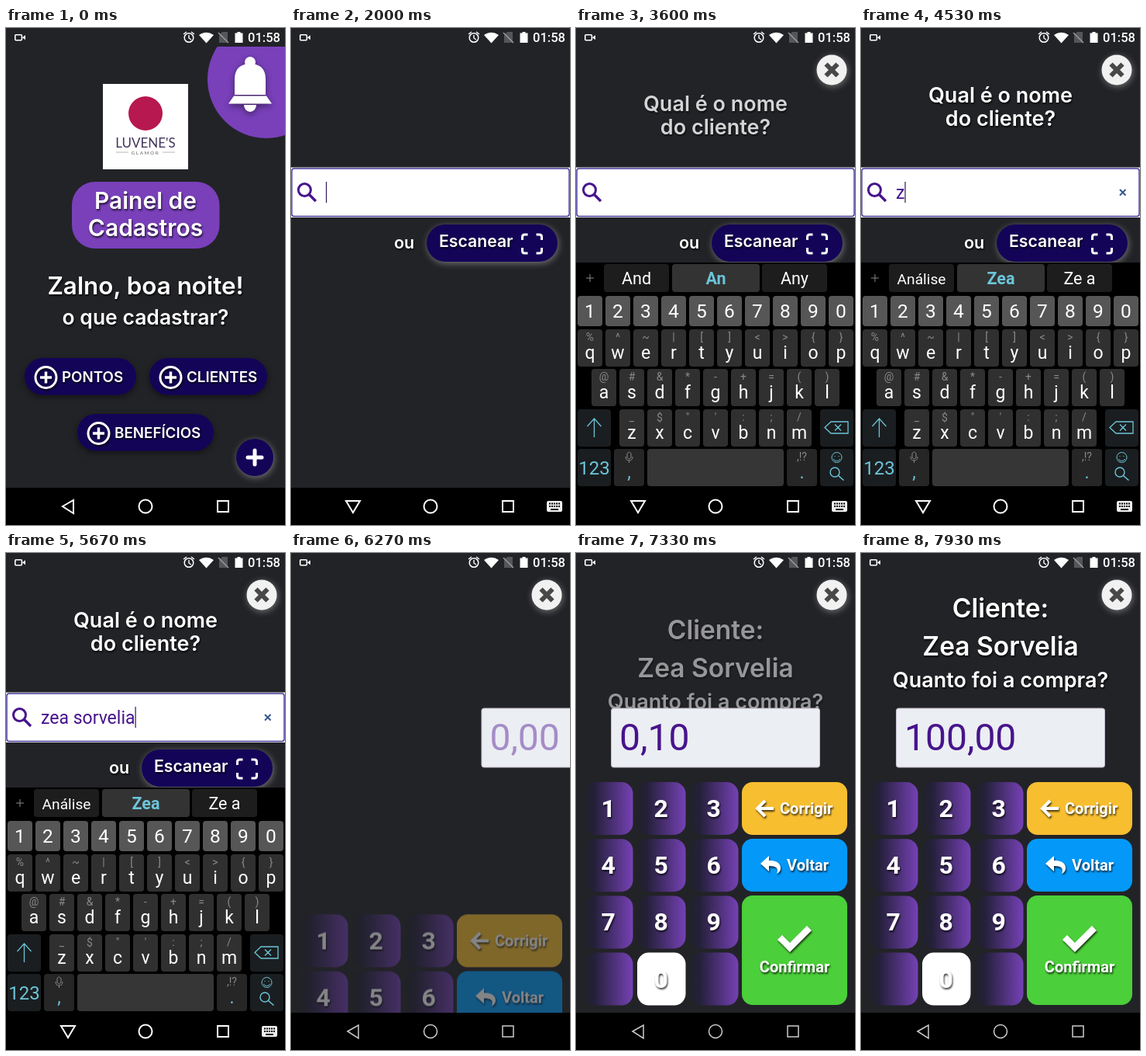
An HTML page for the animation above (8 s loop, 360 px wide and 640 px high).

```html
<!DOCTYPE html>
<html lang="pt-BR">
<head>
<meta charset="utf-8">
<title>Painel de Cadastros</title>
<style>
html, body { margin: 0; width: 100%; height: 100%; overflow: hidden; background: #222327; }
svg { display: block; width: 100vw; height: 100vh; }
text { font-family: Roboto, sans-serif; fill: #fff; }
.h { font-family: Inter, sans-serif; font-weight: 600; }
.m { text-anchor: middle; }
.b { font-weight: 700; }
.sh { filter: drop-shadow(1px 2px 1px #000b); }
.lift { filter: drop-shadow(0 3px 4px #0007); }
.glow { filter: drop-shadow(1px 2px 4px #aaa9); }
</style>
</head>
<body>
<svg id="stage" viewBox="0 0 360 640"></svg>
<script>
const LOOP = 8000;
const NAVY = '#140458', VIOLET = '#7940ba', INK = '#47148c', CYAN = '#6cc5d9';

const text = (s, x, y, size, cls = '', extra = '') =>
  `<text x="${x}" y="${y}" font-size="${size}" class="${cls}" ${extra}>${s}</text>`;
const rect = (x, y, w, h, r, fill, extra = '') =>
  `<rect x="${x}" y="${y}" width="${w}" height="${h}" rx="${r}" fill="${fill}" ${extra}/>`;
const circle = (x, y, r, fill, extra = '') =>
  `<circle cx="${x}" cy="${y}" r="${r}" fill="${fill}" ${extra}/>`;
const line = (d, width, color = '#fff', extra = '') =>
  `<path d="${d}" fill="none" stroke="${color}" stroke-width="${width}" ${extra}/>`;
const group = (id, body, cls = '') => `<g id="${id}" class="${cls}">${body}</g>`;

// Home screen
const pill = (x, y, w, label) => rect(x, y, w, 47.5, 23.5, NAVY, 'class="lift"') +
  `<g class="sh">${circle(x + 27.5, y + 25, 13.5, 'none', 'stroke="#fff" stroke-width="3"')}` +
  line(`M${x + 20} ${y + 25}h15m-7.5 -7.5v15`, 3.5) + '</g>' +
  text(label, x + 48, y + 30.5, 18.8, 'h sh');

const bell = `<g class="lift" fill="#fff">${circle(315, 44, 7, '#fff')}
  <path d="M295 86V66C295 52 303 46 315 46S335 52 335 66V86Z"/>
  <path d="M294 87.5H336L343 97.5H287Z"/><path d="M307 99H323A8 9 0 0 1 307 99Z"/></g>`;

const logo = rect(125, 72, 110, 110, 0, '#fff') + circle(180, 110, 22, '#b7184f') +
  text("LUVENE'S", 180, 153.5, 17, 'm', 'style="font-family:Lato,sans-serif;fill:#43365c"') +
  text('GLAMOR', 180, 162.5, 6.5, 'm', 'letter-spacing="1.5" style="font-family:Lato,sans-serif;fill:#666"') +
  line('M142 160h16m44 0h16', .7, '#999');

const home = group('home',
  circle(336, 66, 76, VIOLET, 'clip-path="url(#below)"') +
  group('menu', bell + logo +
    rect(85, 198, 190.5, 86, 30, VIOLET) +
    text('Painel de', 180, 233, 30, 'h m sh') + text('Cadastros', 180, 268, 30, 'h m sh') +
    text('Zalno, boa noite!', 180, 343, 31.4, 'h m sh') +
    text('o que cadastrar?', 180, 382, 26.5, 'h m sh') +
    pill(24, 425, 144, 'PONTOS') + pill(185, 425, 152, 'CLIENTES') + pill(92, 497, 176, 'BENEFÍCIOS')) +
  circle(321, 553, 24, NAVY, 'class="glow"') +
  line('M312 553h18m-9 -9v18', 5, '#fff', 'stroke-linecap="round"'));

// Client search
const search = group('search',
  group('ask', text('Qual é o nome', 180, 108, 27, 'h m sh') + text('do cliente?', 180, 138, 27, 'h m sh')) +
  rect(0, 179.5, 360, 64.5, 0, '#fff') +
  rect(1, 181, 358, 61.5, 3, '#fff', 'stroke="#44389a" stroke-width="1.5"') +
  circle(17.5, 208.5, 8, 'none', `stroke="${INK}" stroke-width="3"`) +
  line('M23 214L32 223', 3.4, INK) +
  text('', 45, 220, 23, '', `id="query" style="fill:${INK}"`) +
  rect(0, 198, 1.2, 27, 0, '#2d1a55', 'id="caret"') +
  line('M334 208l7.5 7.5m0 -7.5l-7.5 7.5', 2, '#35578c', 'id="clear"') +
  text('ou', 133, 284, 21.5, 'h sh') +
  rect(175, 253, 169, 48, 24, NAVY, 'class="glow"') +
  text('Escanear', 191, 282, 21.2, 'h sh') +
  line('M298.5 273v-4q0-3 3-3h4m11 0h4q3 0 3 3v4m0 10v4q0 3-3 3h-4m-11 0h-4q-3 0-3-3v-4', 3));

// On-screen keyboard
const cyan = `style="fill:${CYAN}"`;
const key = (x, y, w, fill, label = '', hint = '', extra = '') => rect(x, y, w, 48, 4, fill) +
  text(hint, x + w / 2, y + 15, 14, 'm', 'style="fill:#8a8a8a"') +
  text(label, x + w / 2, y + 37.5, 23, 'm', extra);
const row = (x, y, letters, hints) =>
  [...letters].map((c, i) => key(x + 36 * i, y, 32, '#303030', c, hints[i].replace('<', '&lt;'))).join('');

const keyboard = group('keyboard', rect(0, 302, 360, 350, 0, '#000') +
  line('M13 322h10m-5 -5v10', 1, '#888') +
  [[36, 84, '#1d1d1d'], [124, 113, '#333'], [240, 84, '#1d1d1d']].map(([x, w, fill], i) =>
    rect(x, 304, w, 36, 4, fill) +
    text('', x + w / 2, 329.5, 21.5, 'm' + (i == 1 ? ' b' : ''), `id="hint${i}" ` + (i == 1 ? cyan : ''))).join('') +
  [...'1234567890'].map((c, i) => rect(2 + 36 * i, 345, 32, 39, 4, '#565656') + text(c, 18 + 36 * i, 373, 24.5, 'm')).join('') +
  row(2, 388, 'qwertyuiop', '%^~|[]<>{}') +
  row(20, 439, 'asdfghjkl', '@#&*-+=()') +
  row(56, 491, 'zxcvbnm', '_$"\':;/') +
  key(2, 491, 43, '#1b1e20') + key(315, 491, 43, '#1b1e20') +
  key(2, 542, 43, '#1b1e20') + key(49, 542, 39, '#262626', ',', '', cyan) +
  key(92, 542, 176, '#363636') + key(272, 542, 39, '#262626', '.', ',!?', cyan) + key(315, 542, 43, '#1b1e20') +
  text('123', 23.5, 575, 24, 'm', cyan) +
  line('M23.5 527V503m-9 10l9 -10l9 10', 1.3, CYAN) +
  line('M321 514.5l8 -7.5h22v15h-22zm13 -4l8 8m0 -8l-8 8', 1.3, CYAN) +
  line('M66 548q2.5 -4 5 0v5q-2.5 4 -5 0zm-2 4q0 5 4.5 5t4.5 -5m-4.5 5v3', 1, '#888') +
  line('M332 555q4.5 5 9 0m-7 -4v1m5 -1v1', 1, CYAN) +
  circle(336.5, 553, 6.5, 'none', `stroke="${CYAN}"`) +
  circle(334, 572, 6, 'none', `stroke="${CYAN}" stroke-width="1.4"`) + line('M338.5 576.5l7 6', 1.6, CYAN));

// Purchase amount
const PAD = [...'123456789 0 '];
const padKey = (c, i) => {
  const x = 11 + 68 * (i % 3), y = 295 + 73.2 * Math.floor(i / 3);
  return rect(x, y, 62.5, 68, 15, 'url(#padFill)', `id="pad${i}"`) + text(c, x + 30.7, y + 45, 32, 'b m sh');
};
const amount = group('amount',
  group('who', text('Cliente:', 180, 83, 33.5, 'h m sh') + text('Zea Sorvelia', 180, 132, 33.5, 'h m sh') +
    text('Quanto foi a compra?', 180, 172.5, 27, 'h m sh')) +
  group('field', rect(45.5, 200, 269, 76, 3, '#ebeef2', 'stroke="#bfb8c8"') + text('', 56, 254, 48, '', 'id="value"')) +
  group('pad', PAD.map(padKey).join('') +
    rect(214, 295, 136, 68, 14, '#f7be30') + rect(214, 368, 136, 68, 14, '#0499f9') + rect(214, 441, 136, 141, 14, '#4bcf3a') +
    text('Corrigir', 263, 335.5, 20, 'b sh') + text('Voltar', 272, 408.5, 20, 'b sh') + text('Confirmar', 282, 540, 20, 'b m sh') +
    line('M255 329H235m9 -10l-10 10l10 10', 4, '#fff', 'class="sh"') +
    '<path class="sh" fill="#fff" d="M238 400l11-10v6c11 0 15 4 15 10 0 4-3 6-5 7 3-8-2-10-10-10v7z"/>' +
    line('M263 495l13 13L301 483', 8.5, '#fff', 'class="sh"')));

const close = group('close', circle(330, 54, 19.5, '#f1f1f1') +
  line('M322.5 46.5l15 15m0 -15l-15 15', 6, '#484848'), 'glow');

// System bars
const status = rect(11.8, 8.8, 8.6, 7, 1, 'none', 'stroke="#fff" stroke-width="1.6"') +
  '<path d="M21 12.3l4-3v6z" fill="#fff"/>' +
  circle(236, 12.5, 5.8, 'none', 'stroke="#fff" stroke-width="1.5"') +
  line('M236 9v4l3 2M229 8l4 -3m6 0l4 3', 1.4) +
  '<path d="M249 9Q258.5 2.5 268 9L258.5 19.5Z" fill="#fff"/>' +
  '<path d="M275 9l4-4h7v14h-11z" fill="#55565a"/>' + line('M274 6l13 13', 1.5, '#999') +
  '<path d="M295.5 6.5h3v-1.5h4v1.5h3v12.5h-10z" fill="#fff"/>' +
  text('01:58', 312, 18, 16.5, '', 'font-weight="500"');

const nav = rect(0, 592, 360, 48, 0, '#000') +
  `<g id="buttons" fill="none">
    <path id="back" d="M73 616L87 608V625Z"/><path id="down" d="M71 609H89L80 624Z"/>
    <circle cx="180" cy="616" r="8.5"/><path d="M273 609h14v14h-14z"/></g>` +
  group('switcher', rect(330, 609, 20, 14, 2, '#eee') +
    line('M333 612.5h14m-14 3.5h14', 2, '#000', 'stroke-dasharray="2 1"') + line('M335 620h10', 1.8, '#000'));

const stage = document.getElementById('stage');
stage.innerHTML = `<defs><clipPath id="below"><rect y="24" width="360" height="600"/></clipPath>
  <linearGradient id="padFill"><stop stop-color="#20222a"/><stop offset=".2" stop-color="#242039"/>
  <stop offset="1" stop-color="#7541b5"/></linearGradient></defs>
  <rect width="360" height="640" fill="#222327"/>` + home + search + keyboard + amount + close + nav + status;

const el = {};
stage.querySelectorAll('[id]').forEach(e => el[e.id] = e);

// Timetables: [start, state]
const QUERY = [[0, ''], [4470, 'z'], [4730, 'zea'], [5670, 'zea sorvelia']];
const HINTS = [[0, ['', '', '']], [2930, ['And', 'An', 'Any']], [3800, ['Análise', 'Zea', 'Ze a']]];
const VALUE = [[0, '0,00'], [7130, '0,01'], [7330, '0,10'], [7530, '1,00'], [7730, '10,00'], [7930, '100,00']];
const PRESS = [[7070, 0], [7270, 10], [7470, 10], [7670, 10], [7870, 10]];
const CARET = [[0, false], [2000, true], [2530, false], [3070, true], [3470, false],
  [4000, true], [5270, false], [5670, true]];

const at = (table, t) => table.findLast(([start]) => t >= start)[1];
const ramp = (t, a, b) => Math.min(1, Math.max(0, (t - a) / (b - a)));
const bezier = (s, p, q) => 3 * (1 - s) ** 2 * s * p + 3 * (1 - s) * s * s * q + s ** 3;
function ease(x) {
  let lo = 0, hi = 1;
  for (let i = 0; i < 20; i++) {
    const mid = (lo + hi) / 2;
    if (bezier(mid, .25, .25) < x) lo = mid; else hi = mid;
  }
  return bezier(hi, .1, 1);
}
const show = (id, on) => el[id].style.display = on ? '' : 'none';
const put = (id, x, y, opacity = 1) => {
  el[id].setAttribute('transform', `translate(${x} ${y})`);
  el[id].setAttribute('opacity', opacity);
};
const write = (id, s) => { if (el[id].textContent !== s) el[id].textContent = s; };

function draw(t) {
  show('home', t < 2000);
  put('menu', 0, 0, 1 - ramp(t, 1410, 1670));

  show('search', t >= 2000 && t < 5930);
  put('search', 0, 0, 1 - ramp(t, 5690, 5930));
  const ask = ease(ramp(t, 3135, 4065));
  put('ask', 0, 60 * (1 - ask) - 12.5, ask);
  const query = at(QUERY, t);
  write('query', query);
  show('clear', query);
  show('caret', at(CARET, t));
  el.caret.setAttribute('x', 45 + el.query.getComputedTextLength());

  const board = ease(ramp(t, 2230, 2530)) * (1 - ramp(t, 5690, 5900));
  show('keyboard', board > 0);
  put('keyboard', 0, 90 * (1 - board), board);
  at(HINTS, t).forEach((s, i) => {
    write('hint' + i, s);
    el['hint' + i].setAttribute('font-size', s.length > 6 ? 19.2 : 21.5); // long words shrink to fit
  });
  const typing = t >= 1600 && t < 5800;
  show('switcher', typing);
  show('down', typing);
  show('back', !typing);
  el.buttons.setAttribute('stroke', board > 0 ? '#fff' : '#ccc');
  el.buttons.setAttribute('stroke-width', board > 0 ? 2 : 1.5);

  put('close', 0, 0, ease(ramp(t, 2230, 3130)));

  show('amount', t >= 6025);
  const enter = ease(ramp(t, 6025, 6950));
  put('field', 360 * (1 - enter), 0);
  put('pad', 0, 306 * (1 - enter), enter);
  const who = ease(ramp(t, 7050, 7960));
  put('who', 0, 60 * (1 - who), who);
  const value = at(VALUE, t);
  write('value', value);
  el.value.style.fill = value === '0,00' ? '#a58cc8' : INK;
  PAD.forEach((_, i) => {
    const down = PRESS.some(([start, k]) => k === i && t >= start && t < start + 130);
    el['pad' + i].setAttribute('fill', down ? '#fff' : 'url(#padFill)');
  });
}

const begin = performance.now();
function tick() {
  draw((performance.now() - begin) % LOOP);
  requestAnimationFrame(tick);
}
tick();
</script>
</body>
</html>
```
